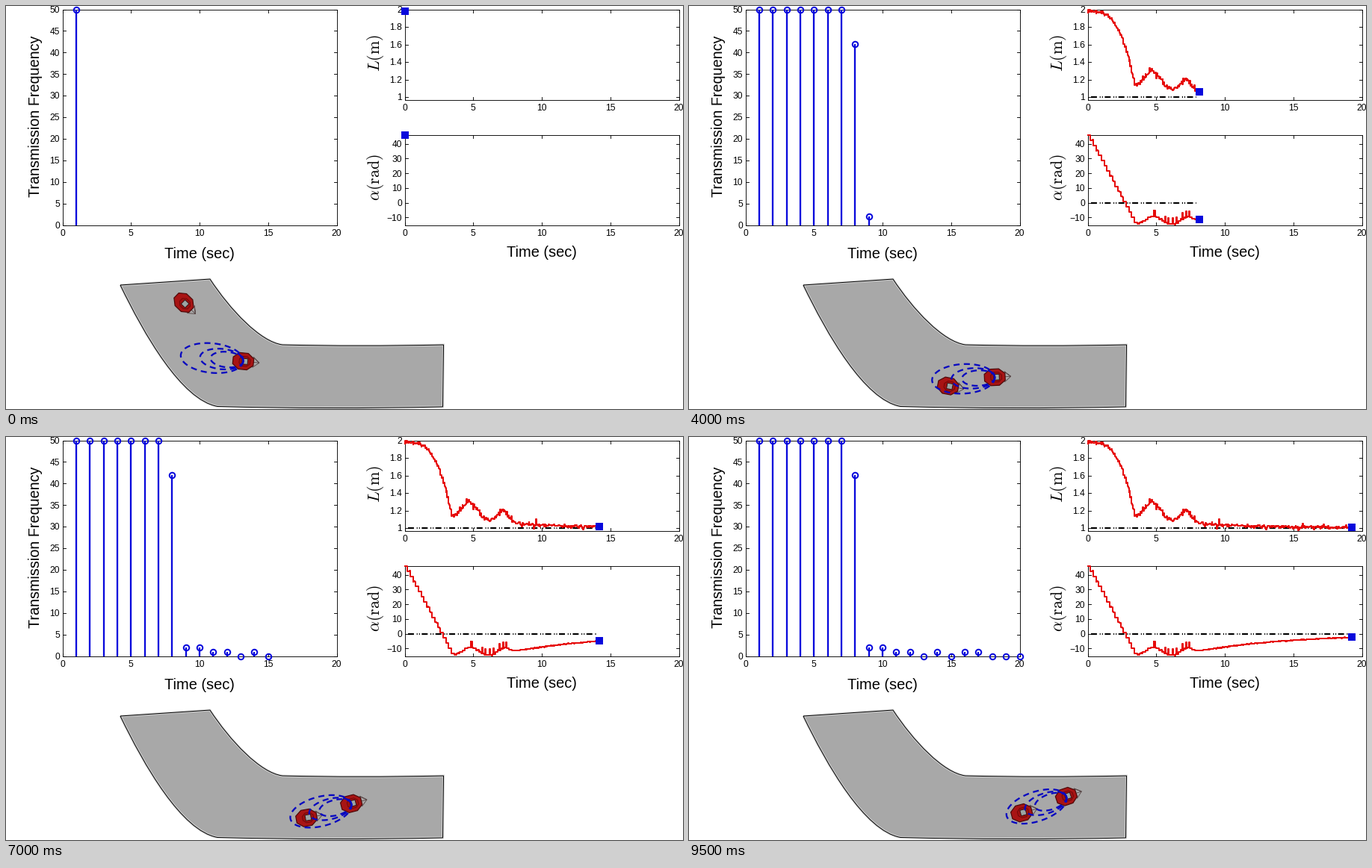
Animation of 906 by 540 pixels, one loop 10000 ms. Source, as a matplotlib script:

```python
import numpy as np
import matplotlib.pyplot as plt
from matplotlib.animation import FuncAnimation
from matplotlib.patches import PathPatch, Polygon, Rectangle
from matplotlib.path import Path

W, H, FRAMES, INTERVAL = 906, 540, 20, 500
STEP = 1.015  # simulated seconds per frame
BLUE, RED, INK = "#0808dc", "#e60a0a", "black"

plt.rcParams["font.family"] = "Liberation Sans"
plt.rcParams["mathtext.fontset"] = "cm"

# At 72 dpi one point is one pixel.
fig = plt.figure(figsize=(W / 72, H / 72), dpi=72, facecolor="white")
ax = fig.add_axes([0, 0, 1, 1])
ax.set(xlim=(0, W), ylim=(H, 0))
ax.axis("off")


class Panel:
    """A boxed plot placed in pixel coordinates."""

    def __init__(self, left, top, width, height, ylim, yticks):
        self.left, self.top, self.width, self.height = left, top, width, height
        self.ylim = ylim
        right, bottom = left + width, top + height
        ax.add_patch(Rectangle((left, top), width, height, fill=False,
                               ec=INK, lw=0.9, zorder=2))
        for t in range(0, 21, 5):
            x = self.x(t)
            self.tick([x, x], [bottom, bottom - 4])
            self.tick([x, x], [top, top + 4])
            ax.text(x, bottom + 14.5, str(t), size=12, color=INK,
                    ha="center", va="baseline")
        for v in yticks:
            y = self.y(v)
            self.tick([left, left + 4], [y, y])
            self.tick([right, right - 4], [y, y])
            ax.text(left - 3.5, y + 4.3, f"{v:g}".replace("-", "\u2212"),
                    size=12, color=INK, ha="right", va="baseline")

    def tick(self, xs, ys):
        ax.plot(xs, ys, color=INK, lw=0.9, zorder=2)

    def x(self, t):
        return self.left + self.width * np.asarray(t) / 20

    def y(self, v):
        low, high = self.ylim
        return self.top + self.height * (high - np.asarray(v)) / (high - low)


def label(x, y, text, size, rotation=0):
    ax.text(x, y, text, size=size, color=INK, ha="center", va="baseline",
            rotation=rotation, rotation_mode="anchor")


freq = Panel(75.5, 4.5, 367, 289, (0, 50), range(0, 51, 5))
dist = Panel(533.5, 4.5, 367, 121, (0.971, 2), np.arange(1, 2.1, 0.2))
angle = Panel(533.5, 172.5, 367, 121, (-15.1, 46.2), range(-10, 41, 10))

label(258.5, 337.5, "Time (sec)", 20)
label(716.5, 335.5, "Time (sec)", 20)
label(45, 148, "Transmission Frequency", 19.8, 90)
label(499.5, 63, r"$L\mathrm{(m)}$", 22, 90)
label(499.5, 230, r"$\alpha\mathrm{(rad)}$", 22, 90)


def bumps(t, first, second):
    """Two overshoots that follow the initial drop."""
    return (first * np.exp(-((t - 4.7) / 0.8) ** 2)
            + second * np.exp(-((t - 7.1) / 0.58) ** 2))


def distance_at(t):
    drop = 1.98 - 0.84 * (t / 3.4) ** 3.1
    settle = 1 + 0.13 * np.exp(-(t - 3.4) / 5) + bumps(t, 0.2, 0.14)
    return np.where(t < 3.4, drop, settle)


def angle_at(t):
    settle = -15 * np.exp(-np.maximum(t - 6.3, 0) / 7) + bumps(t, 5.8, 3.8)
    return np.where(t < 3.45, 46 - 17.4 * t, settle)


# Measurements are held between updates and carry seeded noise.
rng = np.random.default_rng(4)
times = np.arange(0, 20, 0.05)


def hold(period):
    return np.floor(times / period + 1e-6) * period


spikes = (rng.random(times.size) < 0.13) * rng.normal(0, 0.035, times.size)
jitter = (rng.normal(0, 0.011, times.size) + spikes) * np.where(times < 9, 1, 0.65)
dist_data = np.clip(distance_at(hold(0.1)) + jitter, 0.975, 2)

glitch = (abs(times - 5.8) < 1.8) & (rng.random(times.size) < 0.08)
angle_data = angle_at(hold(0.2)) + rng.normal(0, 0.15, times.size) + 4 * glitch
angle_data = np.clip(angle_data, -14.8, 46)

# Saturated at first, then only occasional messages.
counts = [50] * 7 + [42] + [2] * 2 + [1] * 2 + [0, 1] * 2 + [1] + [0] * 3

# Road
M, L, C, Q = Path.MOVETO, Path.LINETO, Path.CURVE4, Path.CURVE3
road = Path([(153, 374), (273, 366), (300, 407), (340, 450), (370, 454),
             (470, 456.5), (585.5, 454), (584.5, 537), (430, 540.5),
             (283, 536.5), (235, 528), (185, 440), (153, 374)],
            [M, L, C, C, C, Q, Q, L, Q, Q, C, C, C])
ax.add_patch(PathPatch(road, fc="#a8a8a8", ec="#d6d6d6", lw=3, zorder=1))
ax.add_patch(PathPatch(road, fill=False, ec=INK, lw=1, zorder=1.1))


def glide(k, start, drift, gain, tau):
    """Steady drift plus a settling transient: position and speed."""
    fade = np.exp(-k / tau)
    return start + drift * k + gain * (1 - fade), drift + gain / tau * fade


def place(points, x, y, heading):
    c, s = np.cos(heading), np.sin(heading)
    return np.asarray(points) @ np.array([[c, s], [-s, c]]) + (x, y)


def octagon(a, b, shift=0):
    corner = np.pi / 8 + np.pi / 4 * np.arange(8)
    return np.c_[shift + a * np.cos(corner), b * np.sin(corner)]


WINDOW = np.array([(-1.5, -3.8), (6, -3.8), (6, 3.8), (-1.5, 3.8)])
NOSE = np.array([(13, -7), (21.5, 0), (13, 7), (13, 0), (21.5, 0), (13, -7)])
PARTS = [(NOSE, "none", "#5a4a4a", 0.9),
         (octagon(15, 12), "#a81414", "#4c0808", 1.2),
         (octagon(8, 7, 2), "#a01010", "#6e0808", 0.9),
         (WINDOW, "#9ca4a4", "#3a1414", 1)]


class Robot:
    def __init__(self, along, down):
        self.along, self.down = along, down
        self.patches = [ax.add_patch(Polygon(shape, fc=fc, ec=ec, lw=lw, zorder=4))
                        for shape, fc, ec, lw in PARTS]

    def pose(self, k):
        """Nose follows the velocity, after turning in at the start."""
        x, vx = glide(k, *self.along)
        y, vy = glide(k, *self.down)
        turn_in = np.radians(18 * np.exp(-k / 0.8) + 0.25 * k)
        return x, y, np.arctan2(vy, vx) - turn_in

    def update(self, k):
        for patch, (shape, *_) in zip(self.patches, PARTS):
            patch.set_xy(place(shape, *self.pose(k)))
        return self.patches


follower = Robot(along=(238, 8.4, 48, 4), down=(397.5, -1.7, 139, 3.46))
leader = Robot(along=(317.5, 8.5, 26, 3.3), down=(476, -2.4, 53, 5.5))

# Nested sensing lobes trailing the leader
LOBES = (42, 29, 22)
turn = np.linspace(0, 2 * np.pi, 120)
lobes = [ax.plot([], [], color="#0808c0", lw=2.3, dashes=(3.5, 2.5), zorder=5,
                 dash_capstyle="butt")[0] for _ in LOBES]

stems, = ax.plot([], [], color=BLUE, lw=2.3, zorder=3, solid_capstyle="butt")
heads, = ax.plot([], [], "o", ms=7.5, mfc="none", mec=BLUE, mew=2, zorder=3)


def trace():
    line, = ax.plot([], [], color=RED, lw=2, zorder=3.2, drawstyle="steps-post")
    rule, = ax.plot([], [], color="black", lw=2.2, zorder=3, dash_capstyle="butt",
                    dashes=(3.6, 1.7, 0.5, 0.9, 0.5, 1.15))
    dot, = ax.plot([], [], "s", ms=10, color=BLUE, mew=0, zorder=6)
    return line, rule, dot


charts = [(dist, distance_at, dist_data, 1, trace()),
          (angle, angle_at, angle_data, 0, trace())]


def update(k):
    now = k * STEP
    n = np.arange(1, k + 2)
    xs, ys = freq.x(n), freq.y(counts[:k + 1])
    base = np.full(k + 1, freq.top + freq.height)
    gap = np.full(k + 1, np.nan)
    stems.set_data(np.c_[xs, xs, gap].ravel(), np.c_[base, ys, gap].ravel())
    heads.set_data(xs, ys)
    artists = [stems, heads]

    past = times < now
    for panel, value_at, data, goal, (line, rule, dot) in charts:
        line.set_data(panel.x(times[past]), panel.y(data[past]))
        ends = [0.27, now - 0.2] if k else []
        rule.set_data(panel.x(ends), panel.y([goal] * len(ends)))
        dot.set_data([panel.x(now)], [panel.y(value_at(now))])
        artists += [line, rule, dot]

    artists += follower.update(k) + leader.update(k)
    for lobe, a in zip(lobes, LOBES):
        oval = np.c_[a * (np.cos(turn) - 1), 0.47 * a * np.sin(turn)]
        lobe.set_data(*place(oval, *leader.pose(k)).T)
    return artists + lobes


anim = FuncAnimation(fig, update, frames=FRAMES, interval=INTERVAL,
                     repeat=True, repeat_delay=0, blit=False)
plt.show()
```
